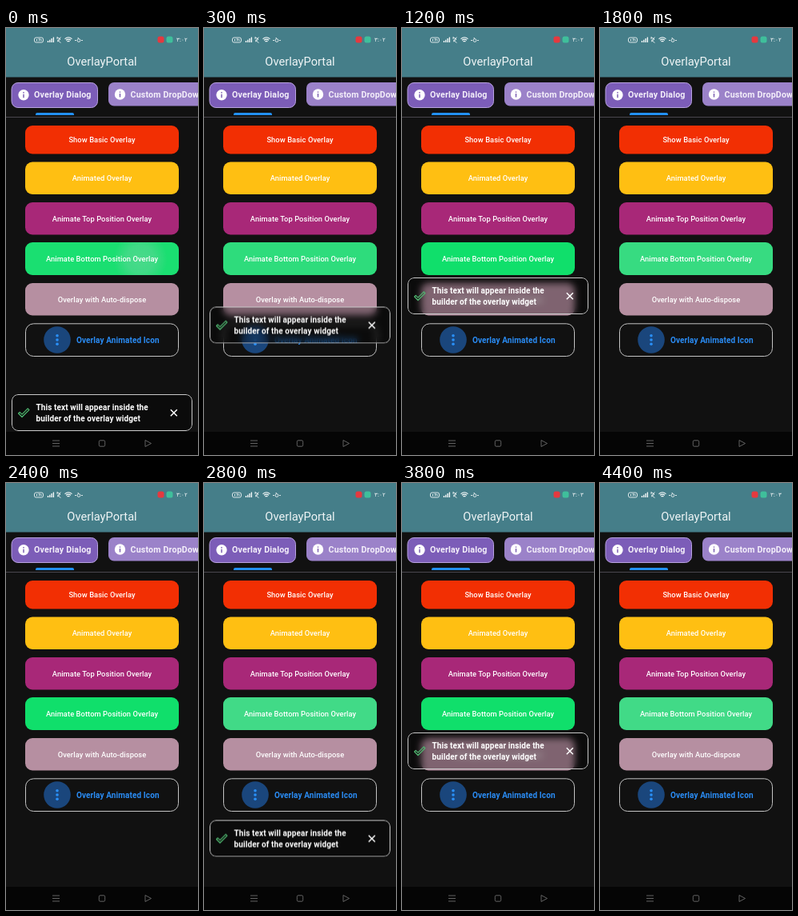
Animation of 240 by 534 pixels, one loop 4.5 s. Source, as an HTML page:

```html
<!DOCTYPE html>
<html lang="en">
<head>
<meta charset="utf-8">
<title>Overlay demo</title>
<style>
  html, body { margin: 0; width: 100%; height: 100%; overflow: hidden; background: #111; }
  #stage { position: relative; width: 240px; height: 534px; overflow: hidden; }
  svg { position: absolute; left: 0; top: 0; display: block; }
  text { font-family: Roboto, "Noto Sans", sans-serif; fill: #fff; }
  .label { font-size: 9.33px; font-weight: 500; letter-spacing: .067px; text-anchor: middle; }
  .bold { font-size: 10px; font-weight: 700; letter-spacing: .1px; }
  .tab { font-size: 10.67px; font-weight: 700; letter-spacing: .17px; fill: #f4effa; }
  .clock { font: 7px "DejaVu Sans", "Noto Sans", sans-serif; direction: ltr; unicode-bidi: bidi-override; }
  .line { fill: none; stroke: #fff; }

  #panel {
    position: absolute; left: 7px; top: 312px; width: 226px; height: 46px;
    box-sizing: border-box; border-radius: 8px; overflow: hidden;
    background: rgba(0, 0, 0, .3);
    -webkit-backdrop-filter: blur(4px); backdrop-filter: blur(4px);
    animation: slide 4.5s infinite, show 4.5s step-end infinite;
  }
  #glow { animation: glow 4.5s step-end infinite; }
  #spot { transform-origin: 168px 289px; animation: spot 4.5s step-end infinite; }
  #before { animation: before 4.5s step-end infinite; }
  #after { animation: after 4.5s step-end infinite; }

  @keyframes slide {
    0% { transform: translateY(146px); animation-timing-function: steps(4); }
    8.888% { transform: none; animation-timing-function: step-end; }
    59.99% { transform: translateY(146px); animation-timing-function: steps(4); }
    68.888%, 100% { transform: none; }
  }
  @keyframes show {
    0%, 59.99% { visibility: visible; }
    35.555%, 95.555%, 100% { visibility: hidden; }
  }
  @keyframes glow {
    0%, 35.555%, 59.99%, 95.555% { opacity: .2; }
    2.222%, 37.777%, 62.222% { opacity: 1; animation-timing-function: steps(5); }
    13.333%, 48.888%, 73.333% { opacity: 0; }
    97.777%, 100% { opacity: 1; }
  }
  @keyframes spot {
    0%, 35.555%, 59.99%, 95.555% { opacity: 1; transform: none; }
    2.222%, 37.777%, 62.222%, 97.777%, 100% { opacity: 0; transform: none; }
    33.333%, 57.777%, 93.333% { opacity: .7; transform: scale(.6); }
  }
  @keyframes before { 0% { opacity: 1; } 77.777%, 100% { opacity: 0; } }
  @keyframes after { 0% { opacity: 0; } 77.777%, 100% { opacity: 1; } }
</style>
</head>
<body>
<div id="stage">
  <svg width="240" height="534" viewBox="0 0 240 534">
    <defs>
      <radialGradient id="soft">
        <stop offset="0" stop-color="#dcc8dc" stop-opacity=".24"/>
        <stop offset=".5" stop-color="#dcc8dc" stop-opacity=".2"/>
        <stop offset="1" stop-color="#dcc8dc" stop-opacity="0"/>
      </radialGradient>
      <clipPath id="greenBox"><rect x="24" y="268" width="192" height="41" rx="9"/></clipPath>
      <g id="info">
        <circle r="6.7" fill="#fff"/>
        <path d="M0-3.6v1.4M0-.9v4.5" stroke="#7658ae" stroke-width="1.4"/>
      </g>
    </defs>
    <rect width="240" height="534" fill="#111"/>

    <!-- status and app bar -->
    <rect width="240" height="61.5" fill="#457e89"/>
    <g class="line" stroke-width=".8">
      <rect x="35.5" y="12" width="11" height="6" rx="2"/>
      <path d="M38.5 13.8v2.6M40.5 13.8h2l-1.2 2.6M44 13.8v2.6"/>
      <path d="M52.5 18v-2M54.8 18v-3.3M57.1 18v-5M59.4 18v-6.6" stroke-width="1.3"/>
      <path d="M64 11.5l4 2.6-4 3M68.500 11.500l-4 4 4 3M64 11v3"/>
      <path d="M73.500 13.600q4.500-3.600 9 0M75 15.300q3-2.400 6 0M76.500 17q1.500-1.300 3 0" stroke-width="1.1"/>
      <circle cx="91" cy="15.500" r="1.900"/>
      <path d="M86 15.500h2M94 15.500h2M89.500 12.600h1.500"/>
    </g>
    <rect x="189.500" y="10.500" width="8" height="8" rx="2.500" fill="#e5393f"/>
    <rect x="200.500" y="10.500" width="8" height="8" rx="2.500" fill="#3fbf9b"/>
    <text id="before" class="clock" x="213" y="17">٣:٠٢</text>
    <text id="after" class="clock" x="213" y="17">٣:٠٣</text>
    <text x="120" y="47.200" font-size="14.67" text-anchor="middle" style="fill:#eef4f5">OverlayPortal</text>

    <!-- tabs -->
    <rect x="7" y="68.500" width="107.500" height="31" rx="8" fill="#7c5db8" stroke="#b9a3e0"/>
    <use href="#info" x="22" y="83.700"/>
    <text class="tab" x="35" y="87.300">Overlay Dialog</text>
    <rect x="128" y="68" width="130" height="29.500" rx="7" fill="#9b82c9"/>
    <use href="#info" x="142.500" y="83"/>
    <text class="tab" x="155.500" y="86.700">Custom DropDown</text>
    <path d="M0 111.500h240" stroke="#49464e"/>
    <path d="M37 109v-1q0-2 2-2h44q2 0 2 2v1z" fill="#2390f2"/>

    <!-- buttons -->
    <rect x="24" y="122" width="192" height="35.500" rx="9" fill="#f22f03"/>
    <rect x="24" y="167.500" width="192" height="40.500" rx="9" fill="#ffbf12"/>
    <rect x="24" y="218" width="192" height="40.500" rx="9" fill="#a82878"/>
    <g clip-path="url(#greenBox)">
      <rect x="24" y="268" width="192" height="41" fill="#10df6b"/>
      <rect id="glow" x="24" y="268" width="192" height="41" fill="#dcc8dc" fill-opacity=".24"/>
      <circle id="spot" cx="168" cy="289" r="34" fill="url(#soft)"/>
    </g>
    <rect x="24" y="319" width="192" height="40.500" rx="9" fill="#b68fa1"/>
    <g class="label">
      <text x="120" y="143">Show Basic Overlay</text>
      <text x="120" y="191">Animated Overlay</text>
      <text x="120" y="241.500">Animate Top Position Overlay</text>
      <text x="120" y="292">Animate Bottom Position Overlay</text>
      <text x="120" y="342.500">Overlay with Auto-dispose</text>
    </g>
    <rect class="line" x="24.500" y="369.800" width="191" height="40.700" rx="10" style="stroke:#c4c4c4"/>
    <circle cx="64" cy="390" r="16.800" fill="#1a467c"/>
    <g fill="#2a90f8">
      <circle cx="64" cy="384.800" r="1.800"/>
      <circle cx="64" cy="390" r="1.800"/>
      <circle cx="64" cy="395.200" r="1.800"/>
    </g>
    <text class="bold" x="88" y="393.700" style="fill:#2a8cf4">Overlay Animated Icon</text>

    <!-- navigation bar -->
    <rect y="505" width="240" height="29" fill="#050505"/>
    <g class="line" style="stroke:#6c6c6c" stroke-width=".9">
      <path d="M58 516h9M58 519.500h9M58 523h9"/>
      <rect x="116.300" y="515.800" width="7.400" height="7.400" rx="1.500"/>
      <path d="M174 515.500v8l7.500-4z" stroke-linejoin="round"/>
    </g>
  </svg>

  <div id="panel">
    <svg width="226" height="46" viewBox="0 0 226 46">
      <rect class="line" x=".5" y=".5" width="225" height="45" rx="7.500" style="stroke:#c8c8c8"/>
      <path d="M8.500 24l1.700-1.700 2.800 2.800 7.200-7.200 1.700 1.700-8.900 8.900z" fill="none" stroke="#4fb870" stroke-width="1.200" stroke-linejoin="round"/>
      <text class="bold" x="30.500" y="19.600">This text will appear inside the</text>
      <text class="bold" x="30.500" y="33.500">builder of the overlay widget</text>
      <path class="line" d="M198.800 19.200l8 8M206.800 19.200l-8 8" stroke-width="1.500"/>
    </svg>
  </div>
</div>
</body>
</html>
```
